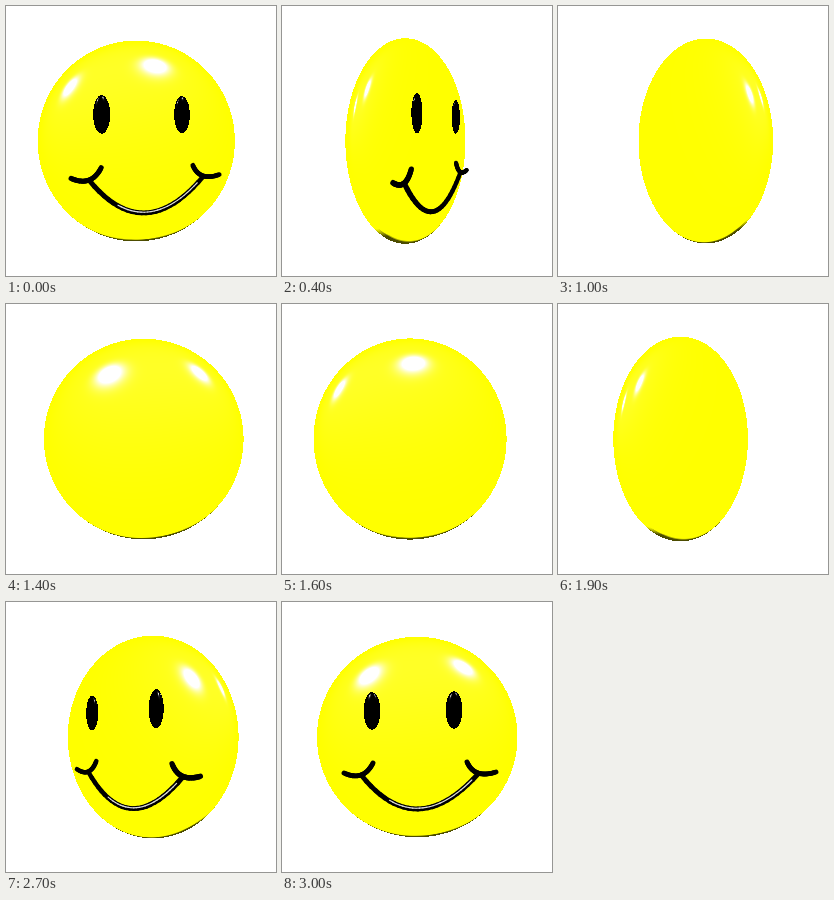
Recreate the animation shown at these times as an HTML page with a canvas. Size 270 px wide and 270 px high, loop 3100 ms.

```html
<!DOCTYPE html>
<html lang="en">
<head>
<meta charset="utf-8">
<title>Spinning smiley</title>
<style>
  html, body { margin: 0; width: 100%; height: 100%; overflow: hidden; background: #fff; }
  canvas { display: block; width: 270px; height: 270px; }
</style>
</head>
<body>
<canvas id="stage" width="270" height="270"></canvas>
<script>
const SIZE = 270, CX = 135.2, CY = 135;
const STEPS = 31, STEP_MS = 100;
const R = 100, B = 26, CAMERA = 375, MOUTH_Z = 20;
const LIGHTS = [[-0.434, -0.554, 0.712], [0.432, -0.653, 0.623]];

const ctx = document.getElementById('stage').getContext('2d');
const layer = document.createElement('canvas');
layer.width = layer.height = SIZE;
const layerCtx = layer.getContext('2d');
const image = layerCtx.createImageData(SIZE, SIZE);

let sin = 0, cos = 1;
const toModel = ([x, y, z]) => [x * cos - z * sin, y, x * sin + z * cos];
const dot = (a, b) => a[0] * b[0] + a[1] * b[1] + a[2] * b[2];
const unit = v => { const n = Math.hypot(v[0], v[1], v[2]); return [v[0] / n, v[1] / n, v[2] / n]; };
const clamp = v => Math.max(0, Math.min(1, v));

// Places a point of the front view at depth z.
function lift(px, py, z) {
  const k = (CAMERA - z) / CAMERA;
  return [(px - CX) * k, (py - CY) * k, z];
}

function project([x, y, z]) {
  const scale = CAMERA / (CAMERA + x * sin - z * cos);
  return [CX + (x * cos + z * sin) * scale, CY + y * scale, scale];
}

function facesCamera([x, y, z]) {
  const eye = [-CAMERA * sin - x, -y, CAMERA * cos - z];
  return dot([x / (R * R), y / (R * R), z / (B * B)], eye) > 0;
}

const curve = (a, c, b, from = 0, to = 1) => Array.from({ length: 25 }, (_, i) => {
  const t = from + (to - from) * i / 24, u = 1 - t;
  const at = k => u * u * a[k] + 2 * u * t * c[k] + t * t * b[k];
  return lift(at(0), at(1), MOUTH_Z);
});

const mouth = [
  curve([80, 174], [134, 241], [196, 172]),
  curve([62, 171], [81.5, 180], [91, 161]),
  curve([185, 160], [192.5, 177], [214, 170])
];
const mouthSheen = curve([80, 173.5], [134, 240], [196, 171.5], 0.25, 0.95);

const solids = [
  { center: [0, 0, 0], radii: [R, R, B], yellow: true },
  { center: lift(90, 109, 26), radii: [7.7, 17.5, 3] },
  { center: lift(172, 108, 26), radii: [7.7, 17.5, 3] }
];

function drawLine(points, width, color, frontOnly) {
  ctx.strokeStyle = color;
  ctx.lineCap = 'round';
  for (let i = 1; i < points.length; i++) {
    if (frontOnly && !facesCamera(points[i])) continue;
    const [x0, y0] = project(points[i - 1]), [x1, y1, scale] = project(points[i]);
    ctx.lineWidth = width * scale;
    ctx.beginPath();
    ctx.moveTo(x0, y0);
    ctx.lineTo(x1, y1);
    ctx.stroke();
  }
}

function drawMouth(frontOnly) {
  for (const line of mouth) drawLine(line, 4.6, '#000', frontOnly);
  if (frontOnly && cos > 0.8) drawLine(mouthSheen, 1.1, '#ddd', true);
}

// Distance along the ray to an ellipsoid, with the normal there.
function hit({ center, radii }, eye, ray) {
  const o = eye.map((v, k) => (v - center[k]) / radii[k]);
  const d = ray.map((v, k) => v / radii[k]);
  const a = dot(d, d), b = dot(o, d), disc = b * b - a * (dot(o, o) - 1);
  if (disc < 0) return null;
  const t = (-b - Math.sqrt(disc)) / a;
  return { t, normal: unit(radii.map((r, k) => (o[k] + t * d[k]) / r)) };
}

// Ray-casts the glossy body and eyes into the layer.
function renderSolids() {
  const data = image.data.fill(0);
  const lights = LIGHTS.map(toModel);
  const eye = toModel([0, 0, CAMERA]);
  for (let py = 0, i = 0; py < SIZE; py++) {
    for (let px = 0; px < SIZE; px++, i += 4) {
      const ray = toModel([px + 0.5 - CX, py + 0.5 - CY, -CAMERA]);
      let near = null, yellow = false;
      for (const solid of solids) {
        const found = hit(solid, eye, ray);
        if (found && (!near || found.t < near.t)) {
          near = found;
          yellow = solid.yellow;
        }
      }
      if (!near) continue;
      const view = unit(ray);
      let diffuse = 0, gloss = 0, glow = 0;
      for (const light of lights) {
        diffuse += Math.max(0, dot(near.normal, light));
        const half = unit(light.map((v, k) => v - view[k]));
        const s = Math.max(0, dot(near.normal, half));
        gloss += 1.6 * s ** 380;
        glow += 0.12 * s ** 15;
      }
      const base = yellow ? 0.3 + 5 * diffuse : 0;
      const shine = yellow ? gloss + glow : 0.6 * gloss;
      data[i] = data[i + 1] = 255 * clamp(base + shine);
      data[i + 2] = 255 * clamp(shine);
      data[i + 3] = 255;
    }
  }
  layerCtx.putImageData(image, 0, 0);
}

function draw(step) {
  const angle = 2 * Math.PI * (step + 1) / STEPS;
  sin = Math.sin(angle);
  cos = Math.cos(angle);
  ctx.fillStyle = '#fff';
  ctx.fillRect(0, 0, SIZE, SIZE);
  drawMouth(false);
  renderSolids();
  ctx.drawImage(layer, 0, 0);
  drawMouth(true);
}

const start = performance.now();
let shown = -1;
function tick() {
  const step = Math.floor((performance.now() - start) / STEP_MS) % STEPS;
  if (step !== shown) draw(shown = step);
  requestAnimationFrame(tick);
}
tick();
</script>
</body>
</html>
```
